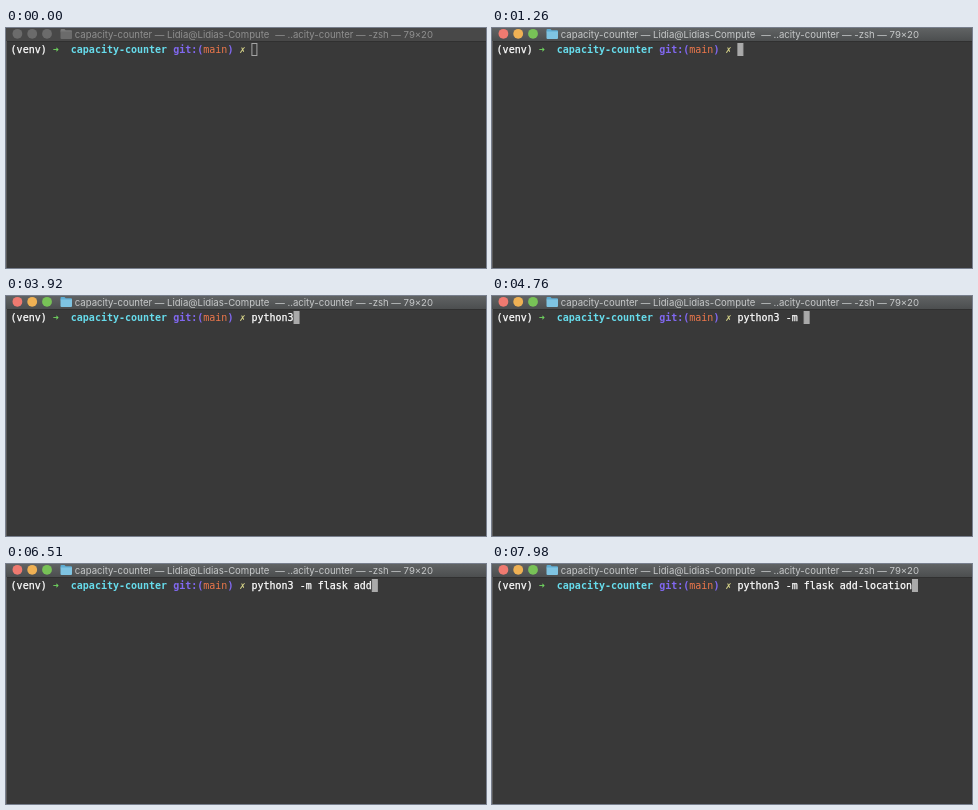
These frames come from a looping animation (480 by 240 pixels, 8000 ms). An HTML page:

```html
<!DOCTYPE html>
<html lang="en">
<head>
<meta charset="utf-8">
<title>Terminal</title>
<style>
html, body { margin: 0; width: 100%; height: 100%; overflow: hidden; background: #393939; }
svg { display: block; width: 480px; height: 240px; }
text { white-space: pre; }
.title { font: 9.55px Inter, sans-serif; fill: #8f8f8f; }
.line { font: 10px "DejaVu Sans Mono", monospace; fill: #fff; stroke: #fff; stroke-width: 0.25px; }
.b { font-weight: bold; stroke: none; }
.thin { font-weight: normal; stroke: none; }
.bar { fill: #484848; }
.light, .folder { fill: #6b6b6b; }
.tab { fill: #7a7a7a; }
#cursor { fill: none; stroke: #a5a5a5; }
.active .bar { fill: url(#shade); }
.active .title { fill: #c6c8c9; }
.active .red { fill: #ef7a70; }
.active .yellow { fill: #efb154; }
.active .green { fill: #78c257; }
.active .folder { fill: #7fc4e2; }
.active .tab { fill: #5fadd3; }
.active #cursor { fill: #aaa; stroke: #aaa; }
</style>
</head>
<body>
<svg id="win" viewBox="0 0 480 240">
  <linearGradient id="shade" x2="0" y2="1">
    <stop stop-color="#606364"/>
    <stop offset="1" stop-color="#4c4e4f"/>
  </linearGradient>
  <rect width="480" height="240" fill="#393939"/>
  <rect class="bar" width="480" height="13"/>
  <rect y="13" width="480" height="1" fill="#303030"/>
  <rect y="13" width="1" height="227" fill="#5c5c5c"/>
  <circle class="light red" cx="11.4" cy="5.8" r="4.9"/>
  <circle class="light yellow" cx="26.200" cy="5.8" r="4.9"/>
  <circle class="light green" cx="41" cy="5.8" r="4.9"/>
  <path class="tab" d="M54.500 2q0-1 1-1h3l1.200 1.200h5.300q1 0 1 1v1h-11.500z"/>
  <path class="folder" d="M54.500 3.500h11.500v6.500q0 1-1 1h-9.500q-1 0-1-1z"/>
  <text class="title" y="9.6"><tspan x="68.800">capacity-counter — Lidia@Lidias-Compute</tspan><tspan x="269.200">— ..acity-counter — -zsh — 79×20</tspan></text>
  <text class="line" x="4.600" y="25">(venv) <tspan class="b" fill="#6fd35f">➜  </tspan><tspan class="b" fill="#67dcec">capacity-counter </tspan><tspan class="b" fill="#8168f0">git:(</tspan><tspan class="thin" fill="#f0784c">main</tspan><tspan class="b" fill="#8168f0">) </tspan><tspan class="b" fill="#d9d68a">✗ </tspan><tspan id="typed"></tspan></text>
  <rect id="cursor" y="15.500" width="5" height="12"/>
</svg>
<script>
const LOOP = 8000, FOCUS = 1190, LEFT = 4.6, COL = 6.02, PROMPT = 40;
const command = "python3 -m flask add-location";
const keyTimes = [
  2660, 2870, 3010, 3150, 3290, 3430, 3920,
  4060, 4340, 4550, 4760,
  5040, 5180, 5320, 5460, 5530, 5670,
  6160, 6370, 6510, 6720,
  6860, 7140, 7210, 7350, 7560, 7700, 7840, 7980
];
const win = document.getElementById("win");
const typed = document.getElementById("typed");
const cursor = document.getElementById("cursor");

function draw(t) {
  const count = keyTimes.filter(k => k <= t).length;
  win.classList.toggle("active", t >= FOCUS);
  typed.textContent = command.slice(0, count);
  cursor.setAttribute("x", LEFT + COL * (PROMPT + count) + 0.5);
}

const start = performance.now();
function tick() {
  draw((performance.now() - start) % LOOP);
  requestAnimationFrame(tick);
}
draw(0);
requestAnimationFrame(tick);
</script>
</body>
</html>
```
